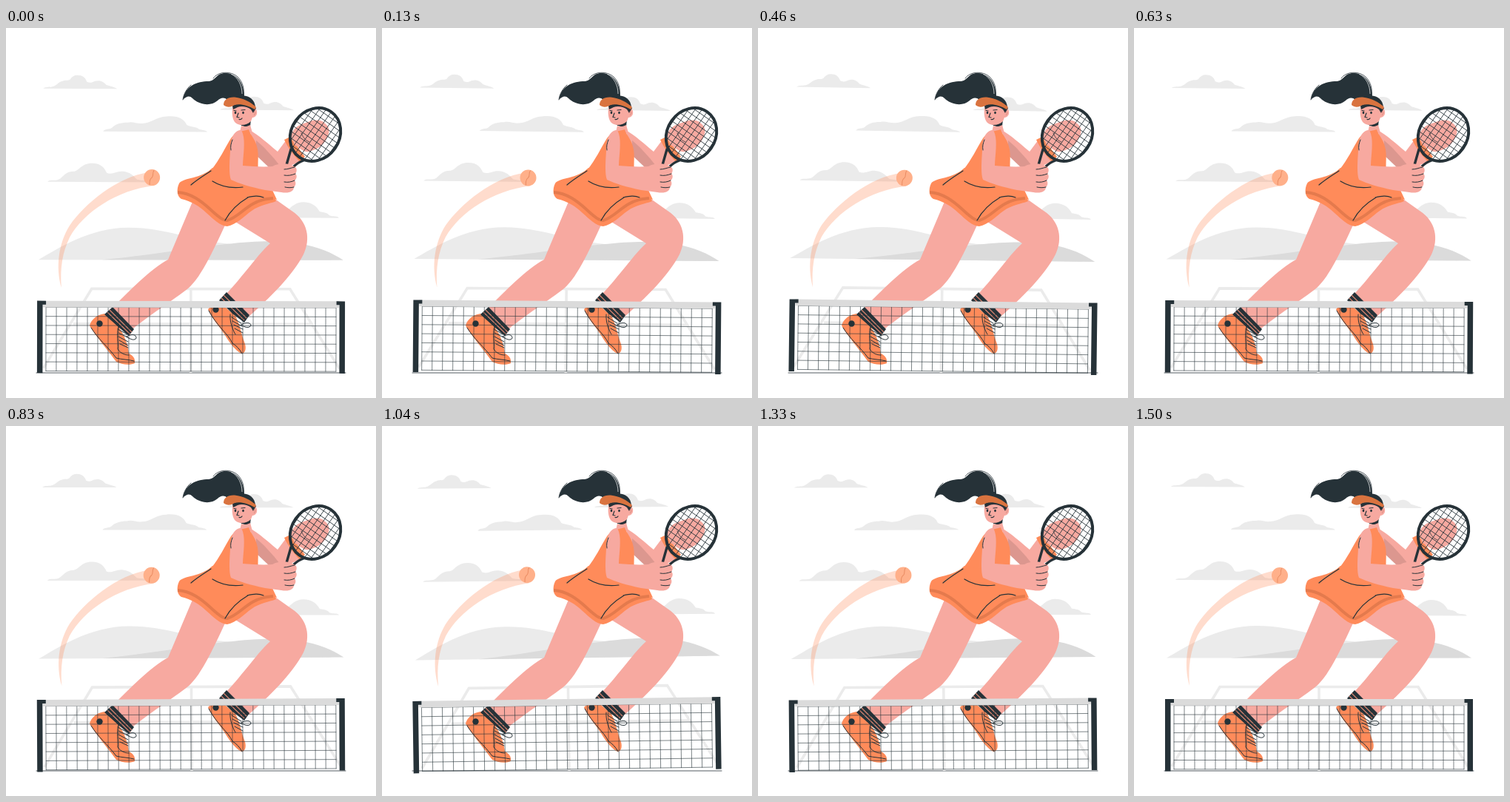
Animation, 500 px wide and 500 px high, one loop 1.54 s. Source, as an HTML page:

```html
<!DOCTYPE html>
<html lang="en">
<head>
<meta charset="utf-8">
<title>Tennis player</title>
<style>
  html, body { margin: 0; width: 100%; height: 100%; overflow: hidden; background: #fff; }
  svg { display: block; width: 100vw; height: 100vh; }
  .ln { fill: none; stroke: #263238; stroke-linecap: round; stroke-linejoin: round; }
  .dark { fill: #263238; }
  .skin { fill: #f7a9a0; }
  .dress { fill: #ff8b5a; }
  .pale { fill: #ebebeb; }
</style>
</head>
<body>
<svg viewBox="0 0 500 500" xmlns="http://www.w3.org/2000/svg">
  <path class="ln" stroke-width=".8" d="M41 466H459"/>

  <g id="scene">
    <path class="pale" d="M44 313.500C70 299 112 270 166 270C218 270 250 288 305 292C350 296 420 306 440 313.500Z"/>
    <path fill="#dbdbdb" d="M130 313.500C190 308 250 297 298 292C340 287 372 287 396 291C422 295 442 304 456 313.500Z"/>
    <path id="puff" class="pale" d="M50 82C53 79 60 81 64 79C69 77 71 73 76 72C80 70 83 72 86 70C89 66 92 64 96 64C103 64 107 67 109 73C113 75 116 74 120 72C127 70 132 73 135 77C140 79 147 80 150 82.500Z"/>
    <use href="#puff" x="239" y="28.500"/>
    <path class="pale" d="M131 140C133 136 139 138 143 135C148 130 155 128 164 128C171 126 177 130 184 129C196 129 202 120 217 119.500C232 118 241 123 244 131C250 134 257 133 261 137C265 138 270 138 272 140.500Z"/>
    <path class="pale" d="M56 208C59 204 67 208 73 204C79 199 82 194 92 194C99 193 102 183 116 183C128 183 133 189 136 196C144 199 149 193 158 194C168 195 172 200 177 205C185 207 193 205 197 208.500Z"/>
    <path class="pale" d="M358 256C366 252 373 251 378 246C384 246 387 236 401 235C414 235 420 241 424 248C430 249 434 249 437 253C442 255 448 253 450 256.500Z"/>
    <path fill="none" stroke="#ebebeb" stroke-width="3.600" d="M51 460L116 352.500H384L451 460M250 352V466M91 400H412"/>
  </g>

  <g id="ball">
    <path fill="#ff8b5a" opacity=".3" d="M193 195C150 201 106 238 86 267C71 291 67 323 75 351C73 325 76 304 86 283C105 249 150 219 200 213Z"/>
    <circle cx="197" cy="202" r="11" fill="#ffb08a"/>
    <path fill="none" stroke="#e98b62" stroke-width="1" d="M200 192C197 196 200 199 197 202C193 205 194 208 194 212"/>
  </g>

  <g id="player">
    <!-- far arm -->
    <path class="skin" d="M329 138C342 145 355 157 367 167L379 151L402 177C391 184 377 191 362 189L337 162Z"/>
    <path fill="#dc978f" d="M338 152C348 160 360 173 370 186L356 189L338 172Z"/>
    <path class="dress" d="M376 151L384 147L404 174L397 181C389 172 381 162 376 151Z"/>
    <path class="skin" d="M385 146C388 133 399 130 408 127C417 123 427 124 430 128C437 133 438 139 435 146C431 156 424 163 410 167C402 169 396 161 390 158Z"/>
    <path class="ln" stroke-width=".8" d="M399 142C402 149 405 152 410 154"/>

    <!-- legs -->
    <path class="skin" d="M254 230L219 313C195 326 168 354 143 379L172 406C190 391 228 366 246 352C265 336 283 294 300 258Z"/>
    <path class="skin" d="M310 262L357 291C342 304 319 337 298 359L328 390C355 366 387 335 402 306C412 285 408 261 386 247C378 241 370 236 362 230L325 235Z"/>

    <!-- feet -->
    <path class="dress" d="M113 402C115 395 121 388 133 386L152 403C157 411 164 422 166 440C171 442 175 446 174 453C168 456 156 455 149 451C140 438 119 414 113 402Z"/>
    <path class="dark" d="M144 377L173 407L166 416L153 405L133 387Z"/>
    <path fill="none" stroke="#d98571" stroke-width="1.200" d="M140 381L170 411M137 384L168 414"/>
    <circle class="dark" cx="126.500" cy="399.500" r="4.200"/>
    <path class="ln" stroke-width="1" d="M115 405C124 420 138 431 149 446C156 448 166 448 173 450M152 404C149 414 152 425 151 434C155 440 161 442 166 442M151 407L164 414M152 412L166 419M152 417L165 424M153 422L165 429M154 427L165 432M163 417C170 413 176 414 176 419C174 423 168 421 163 417"/>
    <path class="dress" d="M273 380C276 376 284 376 289 371L310 389C316 400 318 414 323 427C325 434 323 440 318 440C309 435 304 427 299 420C291 406 278 393 273 380Z"/>
    <path class="dark" d="M298 357L329 388L322 398L306 386L288 368Z"/>
    <path fill="none" stroke="#d98571" stroke-width="1.200" d="M294 361L325 392M291 365L322 395"/>
    <circle class="dark" cx="283.500" cy="380.500" r="4.200"/>
    <path class="ln" stroke-width="1" d="M274 382C285 403 300 413 306 426C311 429 316 434 319 440M303 387C302 398 307 409 310 414M305 391L318 399M306 396L319 403M308 401L320 407M309 406L320 412M318 401C324 397 331 398 331 402C329 406 322 405 318 401"/>

    <!-- ponytail -->
    <path class="dark" d="M322 94C322 77 314 62 298 61C284 60 284 71 274 72C258 72 242 78 239 97C244 92 248 91 252 95C260 103 276 107 286 98C290 94 295 93 299 97Z"/>
    <path class="ln" stroke-width=".8" d="M280 68C287 58 304 58 313 66C321 74 322 83 321 92M239 97C240 89 244 82 250 77"/>
    <path fill="none" stroke="#fff" stroke-width=".7" d="M304 62C314 67 319 78 319 89"/>

    <!-- head -->
    <path class="dark" d="M316 126L331 123L330 133C325 134 319 133 316 130Z"/>
    <path class="skin" d="M318 132C322 134 327 133 330 131L333 142L315 145Z"/>
    <path class="skin" d="M307 102C305 112 305 121 309 127C314 133 325 132 331 126L333 121C338 121 341 115 338 110L334 100Z"/>
    <path class="dark" d="M306 105C314 101 327 102 338 108L334 115L331 110C326 106 318 105 313 107L307 110Z"/>
    <path class="dark" d="M311 94C322 88 336 93 337 107C329 100 320 97 311 94Z"/>
    <path fill="#d9733f" d="M294 104C294 97 300 93 309 93.500C321 95 331 100 338 107L336 110C326 104 316 102 309 104C304 107 299 108 294 104Z"/>
    <ellipse class="dark" cx="310" cy="114.500" rx="1.300" ry="1.700"/>
    <ellipse class="dark" cx="320.500" cy="114.500" rx="1.300" ry="1.700"/>
    <path class="ln" stroke-width="1.200" d="M308 111.500L311 112M318 111L323 110.500M314 115L312 120.500L315 121M315 123.500C317 124 318 123.500 319 122"/>
    <path fill="none" stroke="#c97e75" stroke-width=".7" d="M334 114C337 112 338 115 335 118"/>

    <!-- dress -->
    <path class="dress" d="M304 149C311 139 319 140 328 137C330 145 337 149 340 164C342 177 339 185 342 200L300 206L278 191C288 179 296 162 304 149Z"/>
    <path class="dress" d="M349 219L359 217L366 232L353 229Z"/>
    <path class="dress" d="M279 189C264 204 239 202 234 210C230 218 231 228 237 231C250 234 262 241 271 250C280 258 290 268 299 268C311 266 322 254 332 247C343 239 355 238 365 234C363 228 356 224 351 220L342 190C319 195 299 193 279 189Z"/>
    <path fill="none" stroke="#e47a4d" stroke-width="4" d="M232 222C250 223 264 234 276 245C285 253 292 260 299 260C311 257 322 244 333 238C343 232 352 231 361 230"/>
    <path class="ln" stroke-width="1.200" d="M277 193C268 199 258 205 250 212M279 207C290 214 304 217 320 215M327 229C315 236 303 247 296 260M326 229C335 227 341 226 348 229"/>

    <!-- racket -->
    <path class="ln" stroke-width="3.400" d="M385 164L379 185M402 179C396 181 392 184 388 188"/>
    <g transform="translate(418 144) rotate(35)">
      <clipPath id="head"><ellipse rx="32.500" ry="38"/></clipPath>
      <path id="strings" class="ln" stroke-width=".8" clip-path="url(#head)"/>
      <ellipse class="ln" stroke-width="4" rx="32.500" ry="37.500"/>
    </g>

    <!-- near arm -->
    <path class="skin" d="M316 138C306 140 303 153 303 166C302 181 301 197 304 205C314 210 331 215 350 219L372 222C382 224 389 221 389 215C392 213 392 208 390 206C394 203 393 198 391 197C394 193 393 188 389 187C382 182 369 182 360 187C347 188 333 187 320 186C320 176 323 159 321 147C320 142 319 138 316 138Z"/>
    <path class="ln" stroke-width="1" d="M376 191C381 191 385 189 390 188M376 199C381 200 386 199 391 197M376 208C381 209 386 208 390 206M377 215C381 216 385 216 389 215M306 151C304 156 303 160 304 165"/>
  </g>

  <g id="net">
    <path id="mesh" class="ln" stroke-width=".6"/>
    <rect x="50" y="369" width="400" height="8.800" fill="#dbdbdb"/>
    <path class="dark" d="M42 369H54V374H49.500V466.500H42ZM458 369H446.500V374H450.500V466.500H458Z"/>
  </g>
</svg>
<script>
  const LOOP = 1540, LEAD = 40;
  const el = id => document.getElementById(id);

  // Grid path: vertical lines, then horizontal lines
  function grid(x0, y0, x1, y1, dx, dy) {
    let d = "";
    for (let x = x0; x <= x1 + 0.1; x += dx) d += `M${x} ${y0}V${y1}`;
    for (let y = y0; y <= y1 + 0.1; y += dy) d += `M${x0} ${y}H${x1}`;
    return d;
  }
  el("mesh").setAttribute("d", grid(54, 377.7, 446, 463.8, 14, 12.3));
  el("strings").setAttribute("d", grid(-38, -38, 38, 38, 7.6, 7.6));

  const swaying = [["scene", 250, 250], ["ball", 139, 271], ["net", 250, 418]]
    .map(([id, x, y]) => [el(id), x, y]);

  // Triangle wave between -1 and 1 degree
  function sway(ms) {
    const p = ((ms + LEAD) % LOOP) / LOOP;
    return p < 0.25 ? 4 * p : p < 0.75 ? 2 - 4 * p : 4 * p - 4;
  }

  function draw(ms) {
    const a = sway(ms).toFixed(4);
    for (const [g, x, y] of swaying) g.setAttribute("transform", `rotate(${a} ${x} ${y})`);
  }

  let start;
  function tick(now) {
    start ??= now;
    draw(now - start);
    requestAnimationFrame(tick);
  }
  draw(0);
  requestAnimationFrame(tick);
</script>
</body>
</html>
```
